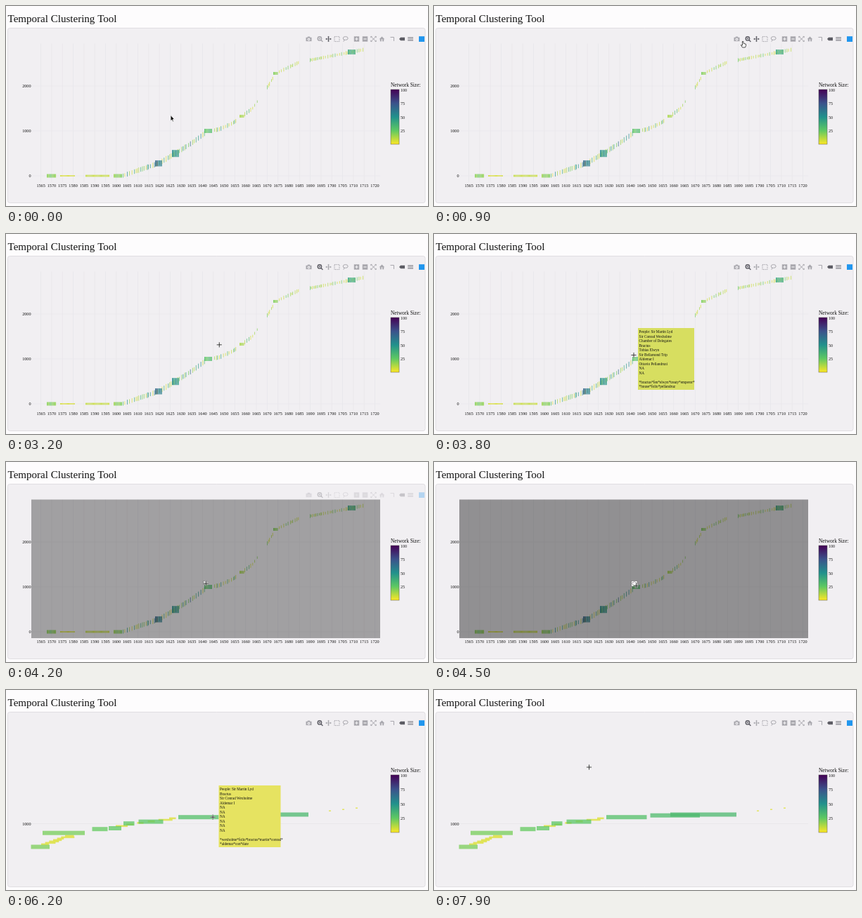
Recreate the animation shown at these times as an HTML page with a canvas. Size 600 by 285 pixels, loop 8000 ms.

```html
<!DOCTYPE html>
<html lang="en">
<head>
<meta charset="utf-8">
<title>Temporal Clustering Tool</title>
<style>
  html, body { margin: 0; height: 100%; overflow: hidden; background: #fdfcfd; }
  canvas { display: block; width: 600px; height: 285px; }
</style>
</head>
<body>
<canvas id="stage"></canvas>
<script>
const canvas = document.getElementById('stage');
const dpr = window.devicePixelRatio || 1;
canvas.width = 600 * dpr;
canvas.height = 285 * dpr;
const c = canvas.getContext('2d');
const LOOP = 8000, ZOOMED = 5700;
const PANEL = '#f1eff2', GRID = '#e8e6ea', GRAY = '#a8a7ad', DARK = '#5c5c64';
const PLOT = { x: 36, y: 53.5, w: 496, h: 197.5 };

// Key points of the trend: x, y
const trend = [
  [165, 242], [185, 235], [216, 224.5], [240, 210.5], [264, 195], [287, 178],
  [302, 176], [322, 167], [350, 146], [373, 113], [383, 96], [417, 80], [509, 62]
];
// Flat blocks on the trend: x start, x end, height, network size
const blocks = [
  [58, 71, 5, .2], [77, 97, 2, .06], [113, 147, 2.8, .09], [153, 165, 5, .18],
  [212, 221, 8.5, .64], [236, 245, 10, .45], [282, 292, 6, .28],
  [332, 338.5, 4, .14], [380, 386, 4, .2], [486, 496, 7, .37]
];
// Stretches of loose ticks between the blocks
const tickRuns = [[166, 282], [296, 327], [339, 357], [371, 380], [388, 418], [432, 509]];
// Zoomed view: large bars (x, y, width) and rising runs of small ones (x, y, to x, to y, count)
const bars = [
  [35.5, 223.5, 26.5], [52, 203.7, 60], [122.5, 198.2, 22], [146, 197, 18], [167, 190.2, 15.5],
  [188.5, 187.6, 35], [245, 181.2, 57.5], [307.5, 178.7, 70.5], [336, 177.5, 94]
];
const smallRuns = [[50, 219, 84, 207, 7], [156, 193, 232, 182, 6], [459, 172, 497, 168, 3]];

const NA = n => Array(n).fill('NA');
const wideTip = ['People: Sir Martin Lyd', 'Sir Conrad Wexholme', 'Chamber of Delegates', 'Bractus',
  'Tobias Elwyn', 'Sir Bellamond Trip', 'Aldemar I', 'Ottavio Pellandruzi', ...NA(2), '',
  '*bractus*fen*elwyn*treaty*emperor*', '*house*folio*pellandruz'];
const zoomTip = ['People: Sir Martin Lyd', 'Bractus', 'Sir Conrad Wexholme', 'Aldemar I', ...NA(6), '',
  '*wexholme*folio*bractus*martin*conrad*', '*aldemar*con*date'];
// Pointer: time, x, y
const pointer = [
  [100, 234, 160], [900, 440, 55], [1400, 438, 59], [2500, 438, 59], [3400, 284, 172],
  [4100, 284, 173], [5150, 295, 183], [6400, 294, 181], [7000, 220.5, 110]
];

const ramp = [[253, 231, 37], [94, 201, 98], [33, 145, 140], [59, 82, 139], [68, 1, 84]];
const clamp = v => Math.max(0, Math.min(1, v));
const mix = (a, b, f) => a + (b - a) * f;
const fade = (t, from, to) => clamp((t - from) / (to - from));
const noise = n => { const s = Math.sin(n * 127.1) * 43758.5; return s - Math.floor(s); };

function sizeColor(v) {
  const i = Math.min(3, Math.floor(v * 4));
  return `rgb(${ramp[i].map((a, k) => Math.round(mix(a, ramp[i + 1][k], v * 4 - i)))})`;
}
function along(points, at, ease = f => f) {
  let i = 1;
  while (i < points.length - 1 && points[i][0] < at) i++;
  const a = points[i - 1], b = points[i], f = ease(fade(at, a[0], b[0]));
  return a.slice(1).map((v, k) => mix(v, b[k + 1], f));
}
const trendY = x => along(trend, x)[0];
const pointerAt = t => along(pointer, t, f => f * f * (3 - 2 * f));

function rect(x, y, w, h, color) {
  c.fillStyle = color;
  c.fillRect(x, y, w, h);
}
function text(s, x, y, size, align = 'left') {
  c.font = `${size}px "Liberation Serif", serif`;
  c.textAlign = align;
  c.fillStyle = '#111';
  c.fillText(s, x, y);
}
function pen(color, width) {
  c.strokeStyle = color;
  c.lineWidth = width;
}
function path(points) {
  c.beginPath();
  points.forEach(([x, y]) => c.lineTo(x, y));
}
function line(...points) { path(points); c.stroke(); }
function shape(color, ...points) {
  path(points);
  c.closePath();
  c.fillStyle = color;
  c.fill();
}
function oval(x, y, rx, ry = rx) {
  c.beginPath();
  c.ellipse(x, y, rx, ry, 0, 0, 7);
  c.stroke();
}

function drawPage() {
  rect(0, 0, 600, 285, '#fdfcfd');
  text('Temporal Clustering Tool', 2.5, 23, 15.05);
  c.beginPath();
  c.roundRect(2.5, 31.5, 593.5, 249, 3);
  c.fillStyle = PANEL;
  c.fill();
  pen('#e0dee2', 1);
  c.stroke();
}

function drawLegend(zoomed) {
  const top = zoomed ? 121 : 119, h = zoomed ? 82 : 78;
  text('Network Size:', 547, top - 4.3, 7.4);
  const g = c.createLinearGradient(0, top + h, 0, top);
  ramp.forEach((_, i) => g.addColorStop(i / 4, sizeColor(i / 4)));
  rect(547, top, 12, h, g);
  pen('#555', .5);
  c.strokeRect(547, top, 12, h);
  for (let v = 25; v <= 100; v += 25)
    text(v, 561, top + 2.5 + h * (1 - v / 100), 6);
}

function drawGridRow(label, y) {
  rect(PLOT.x, y - .4, PLOT.w, .8, GRID);
  text(label, 35.5, y + 2.3, 6.2, 'right');
}

function drawWide() {
  for (let i = 0; i < 32; i++) {
    const x = 49.6 + i * 15.32;
    rect(x - .4, PLOT.y, .8, PLOT.h, GRID);
    text(1565 + i * 5, x, 258, 6.2, 'center');
  }
  for (let v = 0; v <= 2000; v += 1000) drawGridRow(v, 242 - v * .064);

  c.globalAlpha = .75;
  for (const [from, to] of tickRuns)
    for (let x = from; x < to; x += 1.3 + noise(x) * 2.4) {
      const early = Math.exp(-(((x - 235) / 80) ** 2));
      const h = 3 + 3 * early + noise(x + 1) * 2.5;
      const size = .06 + noise(x + 2) ** 2 * (.25 + .4 * early);
      rect(x, trendY(x) - h / 2, .9, h, sizeColor(size));
    }
  c.globalAlpha = .85;
  for (const [from, to, h, size] of blocks) {
    const y = trendY((from + to) / 2);
    for (let x = from; x < to; x += 1.1)
      rect(x, y - h / 2, 1, h, sizeColor(size * (.8 + noise(x) * .4)));
  }
  c.globalAlpha = 1;
}

function drawZoomed() {
  drawGridRow(1000, 190.5);
  c.globalAlpha = .75;
  for (const [x0, y0, x1, y1, n] of smallRuns)
    for (let i = 0; i < n; i++) {
      const f = i / (n - 1), w = x0 > 400 ? 3 : 9 + noise(i + x0) * 11;
      rect(mix(x0, x1, f), mix(y0, y1, f) - .5, w, Math.min(2.6, w / 2), sizeColor(.05));
    }
  for (const [x, y, w] of bars) rect(x, y - 3, w, 6, sizeColor(.19 + x * .0004));
  c.globalAlpha = 1;
}

function drawToolbar(alpha, zoomActive, hover) {
  const y = 47;
  c.globalAlpha = alpha;

  rect(426.5, 44.8, 8, 5.4, GRAY);             // camera
  rect(428.8, 43.6, 3.4, 2, GRAY);
  pen(PANEL, 1.2);
  oval(430.5, 47.5, 1.4);

  pen(zoomActive || hover ? DARK : GRAY, 1.4); // zoom
  oval(445.9, 46.4, 2.7);
  line([448, 48.5], [450.4, 50.9]);
  c.lineWidth = .8;
  line([444.5, 46.4], [447.3, 46.4]);
  line([445.9, 45], [445.9, 47.8]);

  const panColor = zoomActive ? GRAY : DARK;   // pan
  for (let k = 0; k < 4; k++) {
    c.save();
    c.translate(458.5, y);
    c.rotate(k * Math.PI / 2);
    rect(0, -.5, 3, 1, panColor);
    shape(panColor, [4.3, 0], [2.4, -1.6], [2.4, 1.6]);
    c.restore();
  }

  pen(GRAY, 1);                                // box and lasso select
  c.setLineDash([1.6, 1]);
  c.strokeRect(467, 43.6, 7, 7);
  c.setLineDash([]);
  oval(482.7, 46, 3.5, 2.4);
  line([480.3, 48], [480.8, 49.6], [479.6, 50.8]);

  for (const x of [498.5, 510.5]) {            // zoom in, zoom out
    rect(x - 3.7, 43.3, 7.4, 7.4, GRAY);
    rect(x - 2.2, 46.4, 4.4, 1.2, PANEL);
  }
  rect(497.9, 44.8, 1.2, 4.4, PANEL);

  for (const s of [1, -1]) {                   // autoscale
    line([522.5 - 3.5, y - s * 3.5], [522.5 + 3.5, y + s * 3.5]);
    line([522.5 + s * 3.7, 45.2], [522.5 + s * 3.7, 43.4], [522.5 + s * 2, 43.4]);
    line([522.5 + s * 3.7, 48.8], [522.5 + s * 3.7, 50.6], [522.5 + s * 2, 50.6]);
  }
  shape(GRAY, [530.7, 47.3], [534.5, 43.4], [538.3, 47.3]);  // home
  rect(531.8, 47, 2, 3.4, GRAY);
  rect(535.2, 47, 2, 3.4, GRAY);
  line([546.5, 44.5], [551.5, 44.5], [551.5, 50]);           // spike lines
  shape(DARK, [559, y], [561, 44.8], [567, 44.8], [567, 49.2], [561, 49.2]);
  rect(571.2, 44.2, 7.8, 2.4, GRAY);
  rect(571.2, 47.5, 7.8, 2.4, GRAY);
  rect(587, 43.2, 8, 7.8, '#2196ee');
  c.globalAlpha = 1;
}

function drawZoomLabel(alpha) {
  c.globalAlpha = alpha;
  shape('#525d7a', [446, 51.8], [448.8, 55], [443.2, 55]);
  rect(428.5, 54.5, 27, 14, '#525d7a');
  c.font = 'bold 7px "Open Sans", sans-serif';
  c.textAlign = 'center';
  c.fillStyle = '#fff';
  c.fillText('Zoom', 442, 63.8);
  c.globalAlpha = 1;
}

function drawTip(lines, x, y, w, color) {
  rect(x, y, w, 88, color);
  lines.forEach((s, i) => text(s, x + 1.6, y + 7 + i * 6.5, 5.2));
}

function drawSelection(x0, y0, x1, y1, dim) {
  c.beginPath();
  c.rect(PLOT.x, PLOT.y, PLOT.w, PLOT.h);
  c.rect(x0, y0, x1 - x0, y1 - y0);
  c.fillStyle = `rgba(0,0,0,${dim * .4})`;
  c.fill('evenodd');
  const len = Math.min(5, (x1 - x0) * .4, (y1 - y0) * .4);
  for (const [color, width] of [['#444', 2.2], ['#fff', 1.4]]) {
    pen(color, width);
    for (const [x, sx] of [[x0, 1], [x1, -1]])
      for (const [y, sy] of [[y0, 1], [y1, -1]])
        line([x + sx * len, y], [x, y], [x, y + sy * len]);
  }
}

function drawPointer(t) {
  c.save();
  c.translate(...pointerAt(t));
  pen('#fff', .8);
  if (t < 900) {
    shape('#111', [0, -4.5], [0, 3.8], [1.8, 2.2], [3, 5], [4.4, 4.4], [3.2, 1.7], [5.6, 1.5]);
    c.stroke();
  } else if (t < 2650) {
    c.strokeStyle = '#222';
    shape('#fff', [-1.6, -4.5], [-.2, -4.5], [.2, -1.6], [3.4, -.8], [3.6, 1.4], [2.5, 4],
      [-1.5, 4], [-3.6, .6], [-1.5, 1]);
    c.stroke();
  } else {
    for (const [color, width] of [['rgba(255,255,255,.8)', 2], ['#222', .9]]) {
      pen(color, width);
      line([-3.6, 0], [3.6, 0]);
      line([0, -3.6], [0, 3.6]);
    }
  }
  c.restore();
}

function draw(t) {
  const zoomed = t >= ZOOMED;
  c.setTransform(dpr, 0, 0, dpr, 0, 0);
  drawPage();
  drawLegend(zoomed);
  if (zoomed) drawZoomed(); else drawWide();

  if (t >= 4100 && !zoomed) {
    const [x, y] = pointerAt(t);
    drawSelection(281.5, 170.5, x + .5, y, fade(t, 4080, 4225));
  }
  const toolbar = zoomed ? fade(t, ZOOMED, 5900) : 1 - fade(t, 4080, 4250);
  drawToolbar(toolbar, t >= 1900, t >= 900 && t < 2600);
  drawZoomLabel(fade(t, 950, 1200) * (1 - fade(t, 2550, 2800)));
  if (t >= 3450 && t < 4080) drawTip(wideTip, 290, 134, 80, '#d7de60');
  if (t >= 5900 && t < 6450) drawTip(zoomTip, 302.5, 136, 88, '#e6e361');
  drawPointer(t);
}

function tick() {
  draw(performance.now() % LOOP);
  requestAnimationFrame(tick);
}
tick();
</script>
</body>
</html>
```
